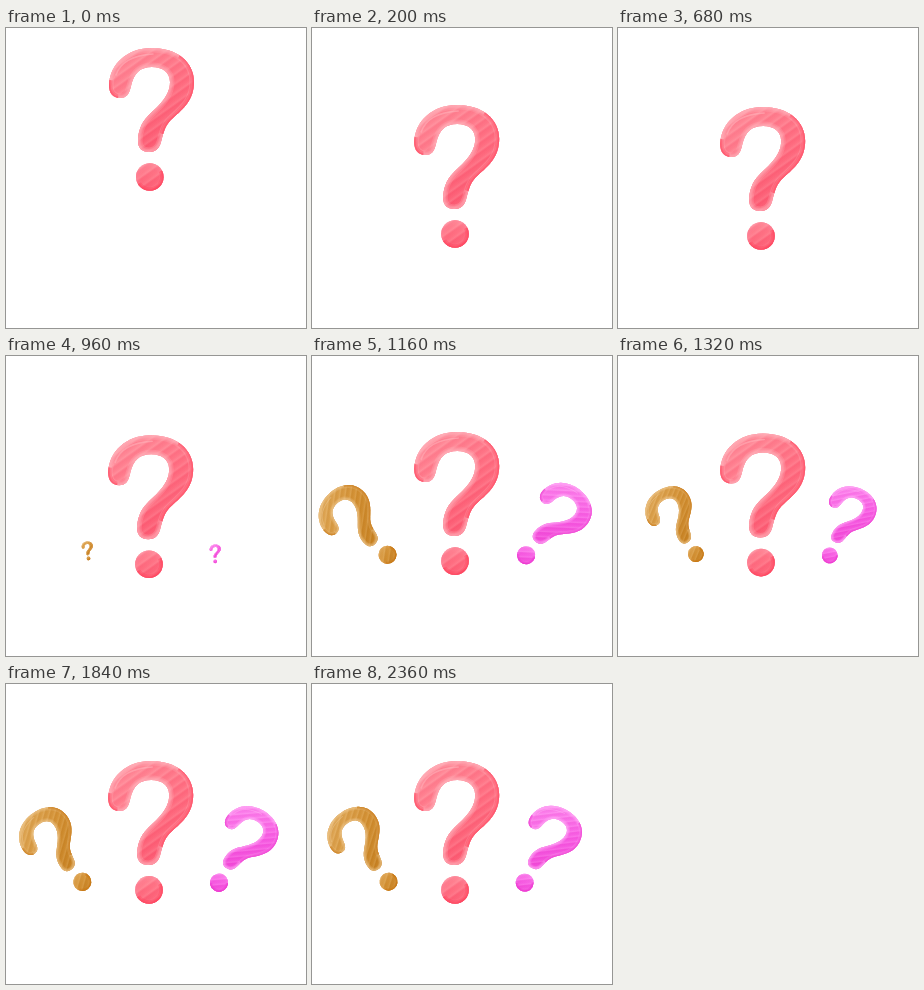
These frames come from a looping animation (300x300 px, 2400 ms). An HTML page with a canvas:

```html
<!DOCTYPE html>
<html lang="en">
<head>
<meta charset="utf-8">
<title>Question marks</title>
<style>
  html, body { margin: 0; width: 100%; height: 100%; overflow: hidden; background: #fff; }
  canvas { display: block; width: 300px; height: 300px; }
</style>
</head>
<body>
<canvas id="stage" width="300" height="300"></canvas>
<script>
const ctx = document.getElementById('stage').getContext('2d');
const LOOP = 2400, STEP = 40, MOVE = 0.2;
const FOOT = { x: 145.8, y: 163 };

const hook = new Path2D(`M103 57 C104 36 121 20 146 20 C171 20 188 34 188 54
  C188 72 177 81 167 90 C159 97 158 103 155 114 C153 121 149 124 143 124
  C136 124 132 120 132 113 C132 104 135 95 142 88 C151 79 164 69 164 54
  C164 44 156 39 146 39 C134 39 128 45 125 58 C123 67 120 70 114 70
  C107 70 103 65 103 57 Z`);
const dot = new Path2D();
dot.arc(143.8, 149, 13.8, 0, Math.PI * 2);
const hookShade = new Path2D(`M174 27 C183 33 188 43 188 54 C188 72 177 81 167 90
  C161 95 159 99 157 106 M103 52 C102 62 105 69 112 70`);
const dotShade = new Path2D();
dotShade.arc(143.8, 149, 13.8, -0.5, 2.6);
const shine = new Path2D('M110 47 C115 33 129 27 147 26');

const pink = { light: '#ff9aa5', base: '#ff7083', dark: '#fa526c', shade: '#ff4059', glow: '#ffb9c1' };
const gold = { light: '#e6b56c', base: '#d39135', dark: '#c07a1c', shade: '#c4720c', glow: '#edc893' };
const magenta = { light: '#ff98f1', base: '#f75fe3', dark: '#ee40d2', shade: '#ec34cc', glow: '#ffb0f5' };

// Linear move, then a decaying overshoot
function spring(t) {
  if (t <= 0) return 0;
  if (t < MOVE) return t / MOVE;
  const s = t - MOVE;
  return 1 + 0.4 * Math.sin(6 * Math.PI * s) * Math.exp(-3 * s);
}

function softStroke(path, color, alpha, widths) {
  ctx.strokeStyle = color;
  ctx.globalAlpha = alpha;
  for (const width of widths) {
    ctx.lineWidth = width;
    ctx.stroke(path);
  }
}

function stripes(color) {
  ctx.save();
  ctx.translate(145, 90);
  ctx.rotate(-0.62);
  ctx.globalAlpha = 0.6;
  for (let y = -100; y < 100; y += 8) {
    const band = ctx.createLinearGradient(0, y, 0, y + 8);
    band.addColorStop(0, color.dark);
    band.addColorStop(0.45, color.base);
    band.addColorStop(0.75, color.light);
    band.addColorStop(1, color.dark);
    ctx.fillStyle = band;
    ctx.fillRect(-110, y, 220, 8);
  }
  ctx.restore();
}

function paint(shape, shade, color, from, to, glow) {
  ctx.save();
  ctx.clip(shape);
  stripes(color);
  const fill = ctx.createLinearGradient(...from, ...to);
  fill.addColorStop(0, color.light);
  fill.addColorStop(0.5, color.base);
  fill.addColorStop(1, color.dark);
  ctx.globalCompositeOperation = 'destination-over';
  ctx.fillStyle = fill;
  ctx.fillRect(95, 10, 100, 160);
  ctx.globalCompositeOperation = 'source-over';
  ctx.globalAlpha = 0.45;
  ctx.fillRect(95, 10, 100, 160);
  softStroke(shape, color.glow, glow, [2, 4, 6, 9]);
  softStroke(shade, color.shade, 0.36, [2, 4, 7]);
  ctx.restore();
}

function drawMark(x, y, scale, degrees, color) {
  ctx.save();
  ctx.translate(x, y);
  ctx.rotate(degrees * Math.PI / 180);
  ctx.scale(scale, scale);
  ctx.translate(-FOOT.x, -FOOT.y);
  paint(hook, hookShade, color, [122, 22], [178, 112], 0.24);
  paint(dot, dotShade, color, [138, 134], [148, 164], 0.04);
  ctx.lineCap = 'round';
  softStroke(shine, color.glow, 0.5, [1.5]);
  ctx.restore();
}

function render(ms) {
  const t = Math.floor(ms % LOOP / STEP) * STEP / 1000;
  ctx.clearRect(0, 0, 300, 300);

  const swing = spring(t - 0.92);
  if (swing > 0) {
    const scale = 0.655 * Math.min(swing, 1);
    const turn = 37.5 * (swing - 1);
    drawMark(83, 204.2, scale, -37 - turn, gold);
    drawMark(209.5, 207.2, scale, 29 + turn, magenta);
  }

  const drop = spring(t);
  drawMark(FOOT.x - 0.8 * drop, FOOT.y + 57 * drop, 1, 0, pink);
}

const start = performance.now();
function tick() {
  render(performance.now() - start);
  requestAnimationFrame(tick);
}
tick();
</script>
</body>
</html>
```
